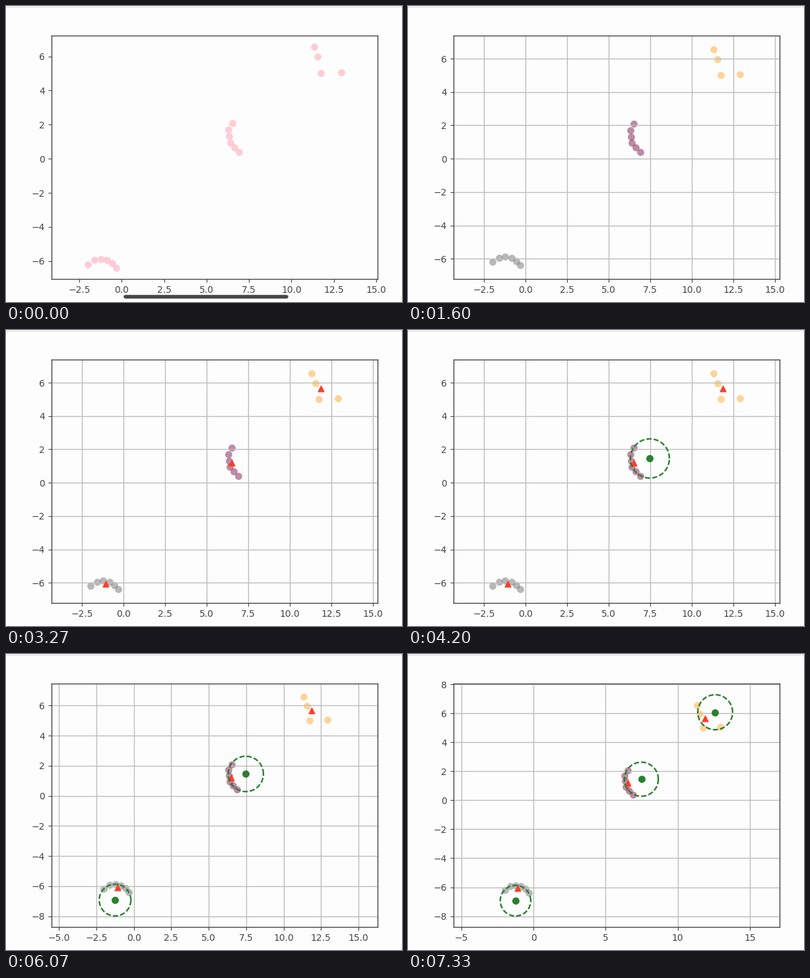
Write a matplotlib script that moves like this. It is 600 px wide and 450 px high and loops after 7590 ms.

```python
import numpy as np
import matplotlib.pyplot as plt
from matplotlib.animation import FuncAnimation

W, H, DPI = 600, 450, 100
FRAMES, STEP = 115, 66
FIRST_CUT, HOLD = 1600, 1133  # ms before the first cut, then between cuts
AX_W, AX_H = 494, 370
SQUASH = 1.008                # x is drawn slightly narrower than y
DOT = 0.15                    # marker extent counted by the autoscale
INK, PAPER, RULE = "#444444", "#fefdfe", "#bcbcbc"
RED, GREEN = "#ff3b2b", "#2a8030"


def arc(center, r, start, stop, n, bend=1.0, wobble=0.0):
    """Points along an arc, alternating slightly out and in."""
    a = np.radians(start + (stop - start) * np.linspace(0, 1, n) ** bend)
    rr = r + wobble * (-1.0) ** np.arange(n)
    return center + np.column_stack([rr * np.cos(a), rr * np.sin(a)])


# Circles in order of appearance; each cluster lies along its circle
CIRCLES = [((7.48, 1.455), 1.175), ((-1.25, -6.93), 1.057),
           ((12.6, 6.08), 1.208)]
SPANS = [dict(start=147, stop=241, n=6, bend=0.95, wobble=-0.03),
         dict(start=135, stop=30, n=6, bend=0.9),
         dict(start=159, stop=288, n=4, bend=1.45, wobble=0.15)]
COLORS = ["#7d1a4b", "#6f7272", "#ffab35"]
CLUSTERS = [arc(*c, **s) for c, s in zip(CIRCLES, SPANS)]


def limits(stage):
    """Five percent margins around all that is shown, with equal aspect."""
    pad = DOT if stage else 0
    points = np.vstack(CLUSTERS)
    low, high = [points.min(0) - pad], [points.max(0) + pad]
    for center, r in CIRCLES[:max(stage - 2, 0)]:
        low.append(np.subtract(center, r))
        high.append(np.add(center, r))
    low, high = np.min(low, 0), np.max(high, 0)
    x, y = (low + high) / 2
    dy = 0.55 * (high - low)[1]
    dx = dy * AX_W / AX_H * SQUASH
    return x - dx, x + dx, y - dy, y + dy


plt.rcParams.update({
    "font.family": "DejaVu Sans", "font.size": 10, "axes.linewidth": 1,
    "axes.edgecolor": INK, "xtick.color": INK, "ytick.color": INK,
})
fig = plt.figure(figsize=(W / DPI, H / DPI), dpi=DPI, facecolor=PAPER)
ax = fig.add_axes([68.8 / W, 1 - 415.1 / H, AX_W / W, AX_H / H],
                  facecolor=PAPER)

# Pixel-space layer for the screen chrome
screen = fig.add_axes([0, 0, 1, 1], zorder=5)
screen.set(xlim=(0, W), ylim=(H, 0))
screen.axis("off")
screen.plot([0, W], [0.5, 0.5], color="#d6d5d7", lw=0.72)
bar, = screen.plot([180.5, 424.5], [441.5, 441.5], color="#464648", lw=4,
                   solid_capstyle="round")


def dots(points, color, **style):
    x, y = np.transpose(points)
    return ax.scatter(x, y, color=color, **style)


def circle(center, r):
    ring, = ax.plot(*arc(center, r, 0, 360, 100).T, color=GREEN, lw=1.7,
                    ls=(0, (3.26, 1.41)), zorder=2.5)
    return [ring, dots([center], GREEN, s=62, linewidths=0, zorder=2.5)]


flat = dict(s=60, linewidths=0)
plain = [dots(p, "pink", alpha=0.8, **flat) for p in CLUSTERS]
labelled = [dots(p, c, alpha=0.5, **flat) for p, c in zip(CLUSTERS, COLORS)]
means = [dots([p.mean(0)], RED, s=40, marker="^", zorder=2) for p in CLUSTERS]
rings = [circle(*c) for c in CIRCLES]


def show(artists, on):
    for artist in artists:
        artist.set_visible(on)


def update(i):
    t = i * STEP
    # Half a step of tolerance keeps each cut on its nearest frame
    stage = min(max(int((t + STEP / 2 - FIRST_CUT) // HOLD) + 1, 0), 5)
    ax.axis(limits(stage))
    if stage:
        ax.grid(True, color=RULE, lw=1)
    else:
        ax.grid(False)
    show(plain, stage == 0)
    show(labelled, stage >= 1)
    show(means, stage >= 2)
    for k, ring in enumerate(rings):
        show(ring, stage >= 3 + k)

    # Home bar slips off the bottom edge
    p = np.clip((t - 130) / 470, 0, 1)
    y = 441.5 + 13 * p * p
    bar.set_ydata([y, y])
    bar.set_alpha(1 - p)
    bar.set_visible(p < 1)
    return []


anim = FuncAnimation(fig, update, frames=FRAMES, interval=STEP, repeat=True,
                     repeat_delay=0, init_func=lambda: update(0))
plt.show()
```
